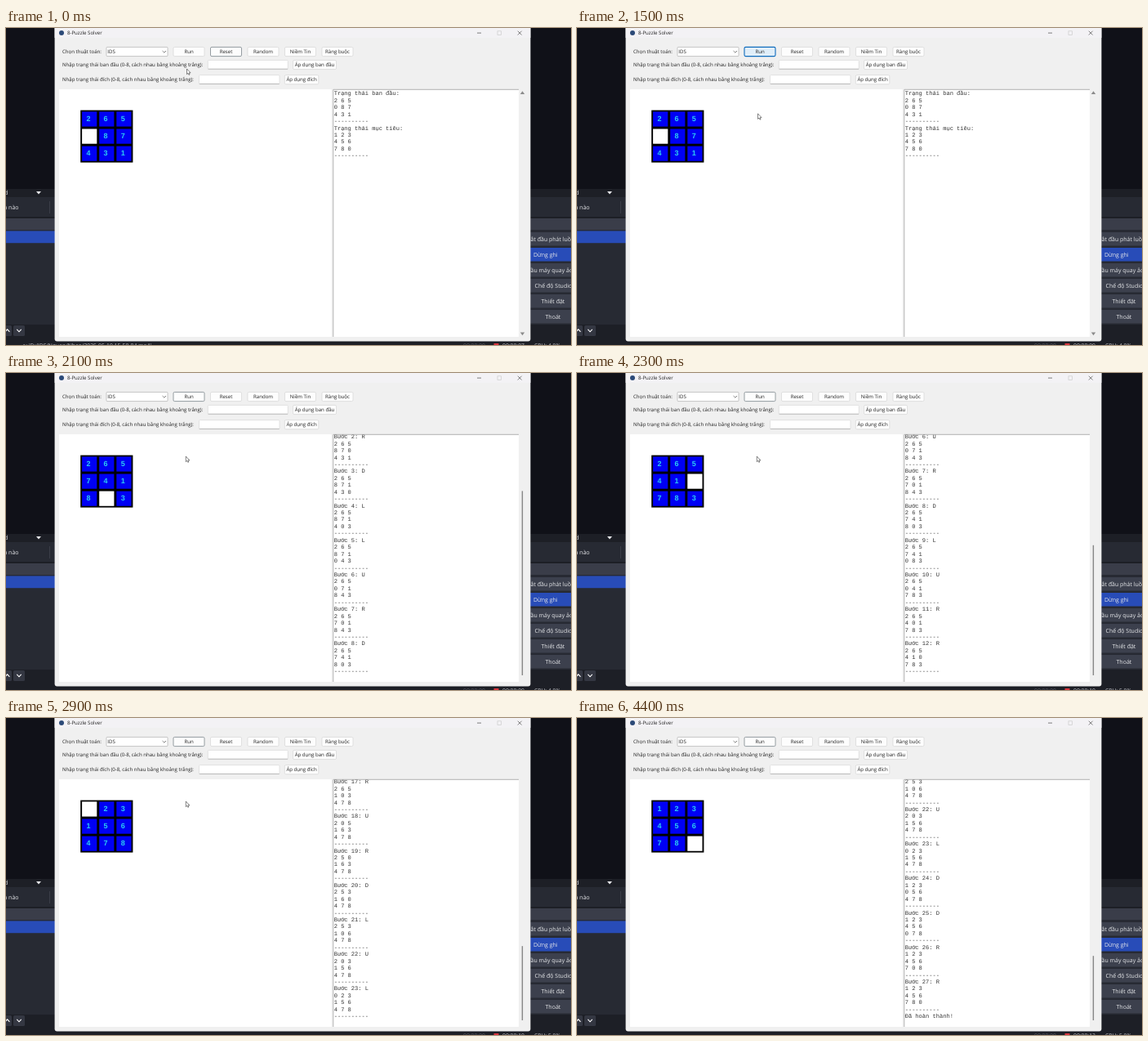
These frames come from a looping animation (692x388 px, 4500 ms). An HTML page:

```html
<!DOCTYPE html>
<html lang="vi">
<head>
<meta charset="utf-8">
<title>8-Puzzle Solver</title>
<style>
html, body { margin: 0; width: 100%; height: 100%; overflow: hidden; background: #101118; }
svg { display: block; width: 692px; height: 388px; }
text { font: 6.1px "Open Sans", "Noto Sans", sans-serif; fill: #222; text-rendering: geometricPrecision; white-space: pre; }
.mid { text-anchor: middle; }
.dock text { font-size: 7px; fill: #e6e7ea; }
.status text { font-size: 6.8px; fill: #c3c4c9; }
#log text { font: 7.05px "Liberation Mono", monospace; fill: #333; }
#board text { font: bold 9px "Liberation Sans", sans-serif; fill: #2bcdf2; text-anchor: middle; }
.btn rect { fill: #fdfdfd; stroke: #d6d6d6; stroke-width: .7; }
.btn.focus rect { stroke: #7b868c; stroke-width: .8; }
.btn.press rect { fill: #e0eef9; stroke: #0f6cbd; stroke-width: 1.1; }
.line { fill: none; stroke: #4a4a4a; stroke-width: .7; }
</style>
</head>
<body>
<svg viewBox="0 0 692 388">
  <defs><clipPath id="logClip"><rect x="401" y="75.6" width="227" height="302"/></clipPath></defs>

  <!-- recorder behind the window -->
  <g class="dock">
    <rect width="692" height="388" fill="#101118"/>
    <rect y="197" width="692" height="191" fill="#1d1f26"/>
    <rect y="207" width="692" height="24" fill="#272a33"/>
    <rect y="233" width="692" height="14" fill="#3a3d49"/>
    <rect y="247" width="692" height="116" fill="#272a33"/>
    <rect y="248.4" width="62" height="14.8" fill="#284cb8"/>
    <text x="-2" y="204">d</text>
    <path d="M37 200h6l-3 3.4z" fill="#e6e7ea"/>
    <text x="-3" y="222">n nào</text>
    <path d="M53.5 212v15" stroke="#41454f" stroke-width=".8"/>
    <rect x="-5" y="364" width="12" height="13" rx="1.5" fill="#343742"/>
    <rect x="9" y="364" width="14" height="13" rx="1.5" fill="#343742"/>
    <path d="M-1 371.8l2.7-3 2.7 3M13.3 368.8l2.7 3 2.7-3" fill="none" stroke="#fff" stroke-width="1.1"/>
    <g id="dockButtons"></g>
  </g>
  <g class="status">
    <text id="saved" x="178" y="390.6" text-anchor="end">o: 'D:/IDS/Nguon/Nhap/2025-05-10 15-50-04.mp4'</text>
    <text x="560" y="390.6" style="fill:#5a5d66">00:00:00</text>
    <rect x="597.5" y="386" width="6" height="6" fill="#d8343c"/>
    <text id="clock" x="608" y="390.6"></text>
    <text id="cpu" x="647" y="390.6"></text>
  </g>

  <!-- window -->
  <rect x="59.6" y="-6" width="582.8" height="389.5" rx="3" fill="#f0f0f0"/>
  <rect x="59.6" width="582.8" height="12" fill="#f3f2f5"/>
  <circle cx="68" cy="6" r="3" fill="#2c4a78"/>
  <text x="75" y="8.3">8-Puzzle Solver</text>
  <path class="line" d="M577 6.1h5M626.8 3.7l4.8 4.8M631.6 3.7l-4.8 4.8"/>
  <rect class="line" x="602" y="3.8" width="4.6" height="4.6" style="stroke:#ccc"/>

  <text x="69" y="31.2">Chọn thuật toán:</text>
  <text x="69" y="47">Nhập trạng thái ban đầu (0-8, cách nhau bằng khoảng trắng):</text>
  <text x="69" y="65.3">Nhập trạng thái đích (0-8, cách nhau bằng khoảng trắng):</text>
  <g fill="#fff" stroke="#d8d8d8" stroke-width=".7">
    <rect x="123" y="23.4" width="75" height="11.2" rx="1" stroke="#b0b0b0"/>
    <rect x="247.3" y="39.4" width="98" height="11" rx="1"/>
    <rect x="236.5" y="57.6" width="98.5" height="11" rx="1"/>
    <path d="M247.5 50.2h97.6M236.8 68.4h98" stroke="#a9a9a9"/>
  </g>
  <text x="124.3" y="31.2">IDS</text>
  <path class="line" d="M191.6 28l2.2 2.2 2.2-2.2"/>
  <g id="buttons"></g>

  <rect x="65" y="75" width="333.5" height="303" fill="#fff"/>
  <rect x="400" y="75" width="228" height="303" fill="#fff"/>
  <path d="M400.8 378V75.3H628" fill="none" stroke="#9c9c9c" stroke-width=".8"/>
  <g id="arrows" fill="#8a8a8a"><path d="M629.8 81h5.4l-2.7-3.8z"/><path d="M629.8 372.4h5.4l-2.7 3.8z"/></g>
  <rect id="thumb" x="631.7" width="1.4" fill="#858585"/>
  <g id="log" clip-path="url(#logClip)"></g>

  <rect x="91.2" y="100.6" width="64.2" height="64" fill="#000"/>
  <g id="board"></g>
  <path id="cursor" d="M0 0V6.6L1.5 5.3L2.5 7.4L3.5 6.9L2.6 4.9H4.6Z" fill="#fff" stroke="#333" stroke-width=".6"/>
</svg>
<script>
const $ = id => document.getElementById(id);
const LOOP = 4500, FRAME = 100, PITCH = 8.44, RULE = "----------";
const START = "265087431", GOAL = "123456780";
const MOVES = "RRDLLURDLURRDLLURURDLULDDRR";
const SHIFT = { R: 1, L: -1, D: 3, U: -3 };

function slide(state, move) {
  const cells = [...state], from = cells.indexOf("0"), to = from + SHIFT[move];
  [cells[from], cells[to]] = [cells[to], "0"];
  return cells.join("");
}
const states = [START];
for (const move of MOVES) states.push(slide(states.at(-1), move));

const block = (title, state) =>
  [title, ...[0, 3, 6].map(i => [...state.slice(i, i + 3)].join(" ")), RULE];

// time, x, y of the pointer tip
const PATH = [
  [0, 221.5, 50], [300, 222, 31], [600, 222, 31], [1100, 221.5, 104.8], [1500, 221.5, 104.8],
  [1800, 220.3, 102], [3200, 220.3, 102], [3300, 220, 101.5], [3400, 220, 101.5], [3500, 219.8, 101],
  [3600, 219.8, 101], [3800, 205, 75], [3900, 203, 60], [4000, 212, 49], [4100, 221, 52], [4200, 225, 60]
];
function pointer(t) {
  const i = PATH.findIndex(p => p[0] >= t);
  if (i <= 0) return PATH[0].slice(1);
  const [a, b] = [PATH[i - 1], PATH[i]], k = (t - a[0]) / (b[0] - a[0]);
  return [a[1] + (b[1] - a[1]) * k, a[2] + (b[2] - a[2]) * k];
}

const button = (id, label, x, y, w) => `<g class="btn" id="${id}">
  <rect x="${x}" y="${y}" width="${w}" height="11.2" rx="1.5"/>
  <text class="mid" x="${x + w / 2}" y="${y + 7.8}">${label}</text></g>`;
$("buttons").innerHTML =
  ["Run", "Reset", "Random", "Niềm Tin", "Ràng buộc"]
    .map((s, i) => button("b" + i, s, 205 + i * 45.5, 23.4, 38)).join("") +
  button("setStart", "Áp dụng ban đầu", 351.5, 39.4, 53) +
  button("setGoal", "Áp dụng đích", 341.3, 57.6, 41.5);

$("dockButtons").innerHTML = [
  ["Bắt đầu phát luồng", 638], ["Dừng ghi", 646], ["Bắt đầu máy quay ảo", 625.5],
  ["Chế độ Studio", 647.5], ["Thiết đặt", 655.5], ["Thoát", 660.5]
].map(([s, x], i) => `<rect x="620" y="${250 + i * 19}" width="80" height="16.6" rx="2"
  fill="${i === 1 ? "#284cb8" : "#3c404d"}"/><text x="${x}" y="${261 + i * 19}">${s}</text>`).join("");

function drawBoard(state) {
  $("board").innerHTML = [...state].map((n, i) => {
    const x = 93.1 + i % 3 * 21.1, y = 102.4 + Math.floor(i / 3) * 21.1;
    return `<rect x="${x}" y="${y}" width="18.2" height="18.2" fill="${n === "0" ? "#fff" : "#0000f4"}"/>` +
      (n === "0" ? "" : `<text x="${x + 7.9}" y="${y + 11.4}">${n}</text>`);
  }).join("");
}

function drawLog(lines) {
  const n = lines.length, skip = Math.max(0, n - 1 - 33.75);
  $("log").innerHTML = lines.map((s, i) => [s, 82.3 + (i - skip) * PITCH])
    .filter(([, y]) => y > 72)
    .map(([s, y]) => `<text x="401.7" y="${y}">${s}</text>`).join("");
  const h = 10 + 9700 / n;
  $("arrows").style.display = skip ? "none" : "";
  $("thumb").style.display = skip ? "" : "none";
  $("thumb").setAttribute("height", h);
  $("thumb").setAttribute("y", 370 - h);
}

function draw(t) {
  const running = t >= 1600;
  const step = Math.min(27, Math.max(0, Math.floor(4.8 + (t - 1900) * 0.01845)));
  const lines = block("Trạng thái ban đầu:", START);
  if (!running) lines.push(...block("Trạng thái mục tiêu:", GOAL));
  for (let i = 1; i <= step; i++) lines.push(...block(`Bước ${i}: ${MOVES[i - 1]}`, states[i]));
  if (t >= 3300) lines.push("Đã hoàn thành!");
  drawLog(lines);
  drawBoard(states[step]);

  $("b0").setAttribute("class", "btn" + (running ? " focus" : t >= 200 ? " press" : ""));
  $("b1").setAttribute("class", "btn" + (t < 300 ? " focus" : ""));
  $("cursor").style.display = t > 4200 ? "none" : "";
  $("cursor").setAttribute("transform", `translate(${pointer(t)})`);
  $("saved").style.display = t < 700 ? "" : "none";
  $("clock").textContent = "00:00:" + String(Math.floor(7.7 + t / 1000)).padStart(2, "0");
  $("cpu").textContent = t < 2300 ? "CPU: 4.0%" : "CPU: 5.0%";
}

let shown = -1;
function tick(now) {
  const t = Math.floor(now % LOOP / FRAME) * FRAME;
  if (t !== shown) draw(shown = t);
  requestAnimationFrame(tick);
}
draw(0);
requestAnimationFrame(tick);
</script>
</body>
</html>
```
